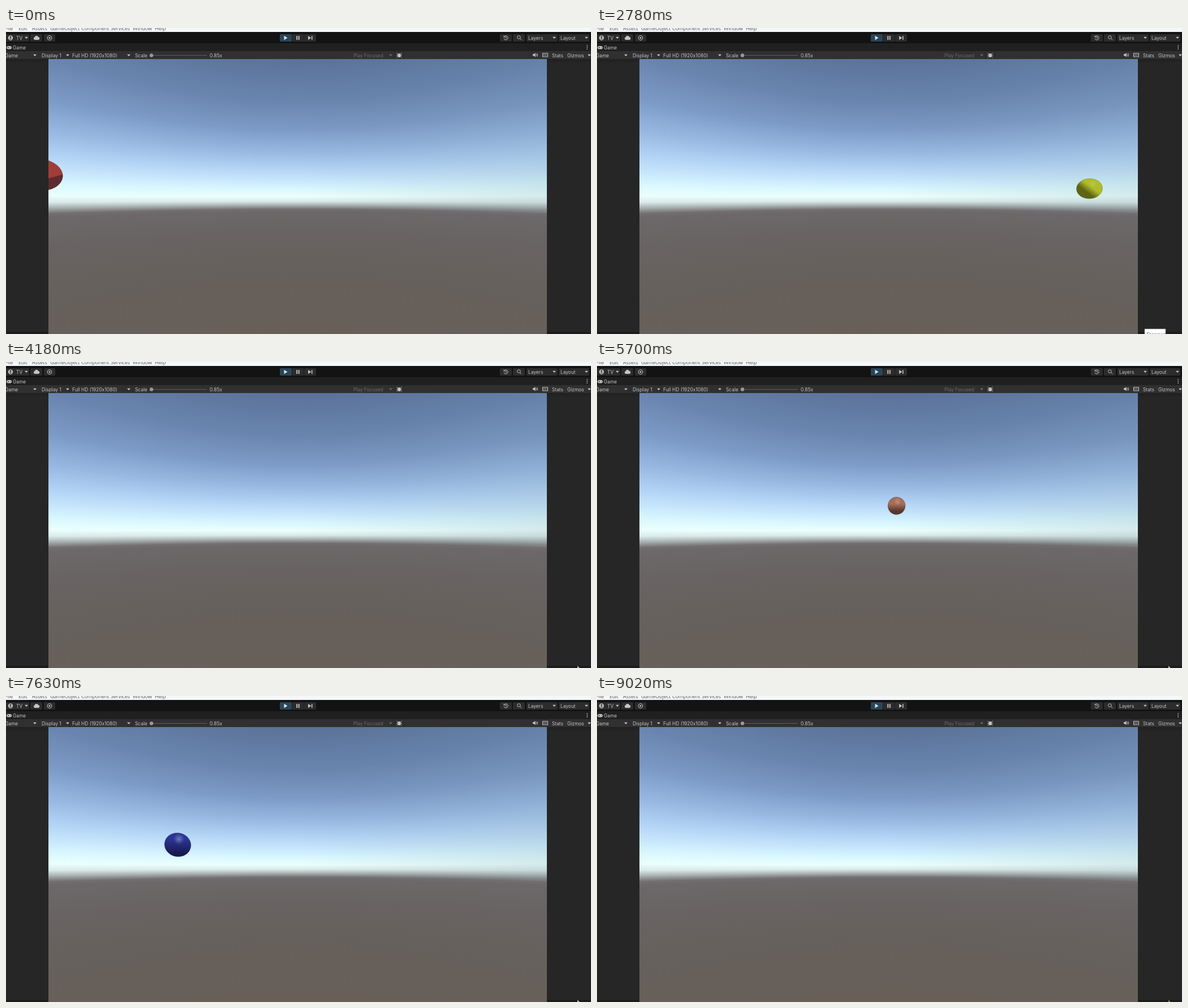
An HTML page with a canvas that plays this animation: 1034x542 px, repeating every 9.75 s.

```html
<!DOCTYPE html>
<html lang="en">
<head>
<meta charset="utf-8">
<title>Falling balls</title>
<style>
html, body { margin: 0; width: 100%; height: 100%; overflow: hidden; background: #262626; }
svg, canvas { position: absolute; display: block; }
svg { left: 0; top: 0; }
canvas { left: 75px; top: 55px; }
text { font: 8.4px Inter, Roboto, sans-serif; fill: #c4c4c4; }
.menu text { font: 9px "Open Sans", "Noto Sans", sans-serif; fill: #50535c; }
.btn rect { fill: #2c2c2c; }
.line { fill: none; stroke: #c4c4c4; stroke-width: 1; }
.icon { fill: #c4c4c4; }
</style>
</head>
<body>
<svg width="1034" height="542" viewBox="0 0 1034 542">
  <rect width="1034" height="542" fill="#262626"/>
  <rect y="55" width="1034" height="2" fill="#202020"/>
  <rect y="57" width="1034" height="4" fill="#232323"/>
  <rect y="538" width="1034" height="4" fill="#1d1d1d"/>
  <rect width="1034" height="7" fill="#f5f7fc"/>
  <rect y="7" width="1034" height="20" fill="#131313"/>
  <rect y="27" width="1034" height="14" fill="#202020"/>
  <rect y="41" width="1034" height="14" fill="#303030"/>
  <g class="menu" id="menu"></g>
  <g class="btn" id="buttons"></g>
  <g id="labels"></g>
  <g id="arrows"></g>

  <circle class="icon" cx="8" cy="17.5" r="4.2"/>
  <circle cx="8" cy="16" r="1.5" fill="#2c2c2c"/>
  <path d="M5.6 20a2.5 2.2 0 0 1 4.8 0z" fill="#2c2c2c"/>
  <path class="icon" d="M51 21a2.4 2.4 0 0 1-.4-4.700a3.300 3.300 0 0 1 6.300-.6a2.700 2.700 0 0 1 .5 5.300z"/>
  <path class="line" d="M77 13.300l3.600 2.100v4.200l-3.600 2.100l-3.600-2.100v-4.200z"/>
  <circle class="icon" cx="77" cy="17.500" r="1.500"/>

  <path d="M491.500 13.800v7.400l6-3.700z" fill="#cfe6f5"/>
  <path class="icon" d="M513.300 14h1.900v7h-1.900zM516.800 14h1.900v7h-1.900zM534 14v7l5.500-3.500zM540 14h1.500v7h-1.500z"/>

  <path class="line" d="M880.500 15.500a3.600 3.600 0 1 1-.4 3M880 13.500v2.500h2.500M883.700 15.300v2.400l1.800 1"/>
  <circle class="line" cx="906.500" cy="16.500" r="2.800"/>
  <path class="line" d="M908.600 18.600l2.700 2.700"/>

  <rect class="icon" x="1" y="32" width="9" height="5.500" rx="2.700"/>
  <path d="M2.500 34.700h2.600M3.800 33.400v2.600M7 34.700h1.400" stroke="#202020" stroke-width=".8"/>
  <path class="icon" d="M1026.500 30.500h1.500v1.500h-1.500zM1026.500 33.500h1.500v1.500h-1.500zM1026.500 36.500h1.500v1.500h-1.500z"/>

  <path d="M257 48.500H355" stroke="#5e5e5e" stroke-width="1"/>
  <circle cx="257" cy="48.500" r="3.200" fill="#999"/>
  <path d="M57.500 41v14M112.500 41v14M223.500 41v14M686.500 41v14M703.500 41v14" stroke="#272727"/>

  <ellipse class="icon" cx="695" cy="48.500" rx="2.600" ry="3.600"/>
  <path class="line" d="M690.500 44.500l9 7.500M699.500 44.500l-9 7.500M690.300 48.300h9.400" stroke-width=".8"/>
  <path class="icon" d="M931 46.300h2l2.700-2.300v7.500l-2.700-2.300h-2z"/>
  <path class="line" d="M937 46q1.200 1.800 0 3.600M938.600 44.800q2.200 3 0 6"/>
  <rect class="line" x="948.500" y="44.800" width="9" height="6.200"/>
  <path class="line" d="M949.500 46.800h7M949.500 48.800h7" stroke-dasharray="1 .7"/>

  <g id="tip">
    <rect x="968" y="533" width="37" height="12" fill="#fff" stroke="#8c8c8c" stroke-width=".6"/>
    <text x="971.500" y="545.500" style="font:8.800px 'Open Sans','Noto Sans',sans-serif;fill:#555">Stoppen</text>
  </g>
  <path id="cursor" d="M1010 538l4.200 4.500h-4.200z"/>
</svg>
<canvas id="view" width="881" height="487"></canvas>

<script>
const $ = id => document.getElementById(id);
const svgNode = (parent, tag, attrs, text) => {
  const node = document.createElementNS("http://www.w3.org/2000/svg", tag);
  for (const key in attrs) node.setAttribute(key, attrs[key]);
  if (text) node.textContent = text;
  parent.append(node);
};

// Editor chrome
const menu = [["File", -2], ["Edit", 22], ["Assets", 46], ["GameObject", 78],
  ["Component", 133], ["Services", 185], ["Window", 224], ["Help", 263]];
menu.forEach(([name, x]) => svgNode($("menu"), "text", { x, y: 4 }, name));

const buttons = [[-3, 44], [43, 21], [67, 20], [484, 21], [505.5, 21], [527, 21],
  [873, 21], [896, 21], [920, 55], [977, 54]];
buttons.forEach(([x, width]) => svgNode($("buttons"), "rect",
  { x, y: 11, width, height: 13, rx: 1.5, style: x === 484 ? "fill:#2b4558" : "" }));

const labels = [["TV", 18, 20.5], ["Layers", 923, 20.5], ["Layout", 980, 20.5],
  ["Game", 12, 38], ["Game", -2, 51.5], ["Display 1", 63, 51.5],
  ["Full HD (1920x1080)", 117, 51.5], ["Scale", 228, 52], ["0.85x", 360, 52],
  ["Play Focused", 614, 51.5, "#6b6b6b"], ["Stats", 965, 51.5], ["Gizmos", 992, 51.5]];
labels.forEach(([name, x, y, color]) => svgNode($("labels"), "text",
  { x, y, style: color ? "fill:" + color : "" }, name));

const arrows = [[36, 17], [969, 17], [1026, 17], [51, 48], [109, 48], [217, 48],
  [680, 48, "#6b6b6b"], [1031, 48]];
arrows.forEach(([x, y, fill = "#c4c4c4"]) => svgNode($("arrows"), "path",
  { d: `M${x - 3} ${y - 1.3}h6l-3 3.2z`, fill }));

// Camera: level, centred on (CX, CY), focal length in pixels
const CX = 515.5, CY = 303, FOCAL = 429;
const LEFT = 75, TOP = 55, WIDTH = 881, HEIGHT = 487;
const view = $("view").getContext("2d");
view.translate(-LEFT, -TOP);

// Colour by height in the middle column
const sky = [[55, "#5c7298"], [130, "#6985af"], [180, "#7c9ac6"], [220, "#98b8e2"],
  [250, "#b3d4f5"], [270, "#c8e7fc"], [285, "#d9f7fe"], [299, "#ebfffd"],
  [307, "#d9ebe9"], [314, "#a9b0b0"], [321, "#736f70"], [326, "#6c6869"],
  [360, "#696464"], [420, "#66615c"], [542, "#685f58"]];

function paintSky() {
  const canvas = document.createElement("canvas");
  canvas.width = WIDTH;
  canvas.height = HEIGHT;
  const ctx = canvas.getContext("2d");
  ctx.translate(-LEFT, -TOP);
  for (let x = LEFT; x < LEFT + WIDTH; x++) {
    const bend = Math.hypot(1, (x - CX) / FOCAL);
    const place = y => CY + (y - CY) * bend;
    const column = ctx.createLinearGradient(0, place(TOP), 0, place(542));
    sky.forEach(([y, color]) => column.addColorStop((y - TOP) / HEIGHT, color));
    ctx.fillStyle = column;
    ctx.fillRect(x, TOP, 1, HEIGHT);
  }
  const dim = ctx.createLinearGradient(CX, 0, LEFT + WIDTH, 0);
  dim.addColorStop(0, "rgba(70,100,115,0)");
  dim.addColorStop(1, "rgba(70,100,115,.13)");
  ctx.fillStyle = dim;
  ctx.fillRect(CX, TOP, WIDTH, 270);
  return canvas;
}
const backdrop = paintSky();

// Balls drop from 12 m above the camera; scale is pixels per metre.
// Each one passes height y at the given step.
const STEP = 0.0665, DROP = 12, HALF_G = 4.905;
const balls = [
  { x: 59.5, scale: 56, step: 0, y: 260, lit: "#a03d39", dark: "#5f2a2d", from: .67, to: .69, lean: .26, shine: 0 },
  { x: 73, scale: 38, step: 4, y: 42, lit: "#97978a", dark: "#4c4c45", from: .3, to: .8 },
  { x: 335, scale: 24, step: 20, y: 112.5, lit: "#dc62b4", dark: "#7d3a69", from: .3, to: .8, shine: .25 },
  { x: 870.5, scale: 35.5, step: 42, y: 284.5, lit: "#aebc2a", dark: "#5e6614", from: .38, to: .72, lean: -.6, shine: .15 },
  { x: 150, scale: 58, step: 54, y: 50, lit: "#b0685a", dark: "#573530", from: .4, to: .8 },
  { x: 529.5, scale: 31, step: 91, y: 419, lit: "#a86c58", dark: "#55382f", from: .4, to: .8 },
  { x: 259, scale: 80, step: 104, y: 245.5, lit: "#8fa467", dark: "#3d4631", from: .38, to: .82 },
  { x: 303.5, scale: 42, step: 115, y: 263.5, lit: "#2c3596", dark: "#171a52", from: .25, to: .88, shine: .32 },
  { x: 811, scale: 47, step: 124, y: 40, lit: "#ac6a5a", dark: "#563630", from: .4, to: .8 },
];
balls.forEach(b => {
  const fall = Math.sqrt((DROP - (CY - b.y) / b.scale) / HALF_G);
  b.birth = b.step - fall / STEP;
});

function drawBall(b, step) {
  const age = (step - b.birth) * STEP;
  if (age < 0) return;
  const { x, scale, lean = 0, shine = .22 } = b;
  const y = CY - scale * (DROP - HALF_G * age * age);
  const r = scale / 2;
  if (y < TOP - 2 * r || y > 542 + 2 * r) return;

  // Wide-angle stretch away from the centre of the view
  const dx = x - CX, dy = y - CY;
  const long = r * Math.hypot(1, Math.hypot(dx, dy) / FOCAL);
  view.beginPath();
  view.ellipse(x, y, long, r, Math.atan2(dy, dx), 0, 2 * Math.PI);

  const gx = lean * r, gy = Math.sqrt(1 - lean * lean) * r;
  const shade = view.createLinearGradient(x - gx, y - gy, x + gx, y + gy);
  shade.addColorStop(b.from, b.lit);
  shade.addColorStop(b.to, b.dark);
  view.fillStyle = shade;
  view.fill();

  const hx = x + r * .1 - lean * r * .4, hy = y - r * .48;
  const glow = view.createRadialGradient(hx, hy, 0, hx, hy, r * .45);
  glow.addColorStop(0, `rgba(255,255,255,${shine})`);
  glow.addColorStop(1, "rgba(255,255,255,0)");
  view.fillStyle = glow;
  view.fill();
  view.strokeStyle = "rgba(40,40,45,.3)";
  view.lineWidth = .8;
  view.stroke();
}

function show(ms) {
  const step = Math.floor(ms < 1300 ? ms / 65 : 20 + (ms - 1300) / 66.5);
  view.drawImage(backdrop, LEFT, TOP);
  balls.forEach(b => drawBall(b, step));
  $("tip").style.display = step >= 18 && step < 58 ? "" : "none";
  $("cursor").style.display = step >= 58 ? "" : "none";
  $("cursor").style.fill = step < 130 ? "#c9c9c9" : "#8d8a4c";
}

const LOOP = 9750, start = performance.now();
function tick() {
  show((performance.now() - start) % LOOP);
  requestAnimationFrame(tick);
}
tick();
</script>
</body>
</html>
```
